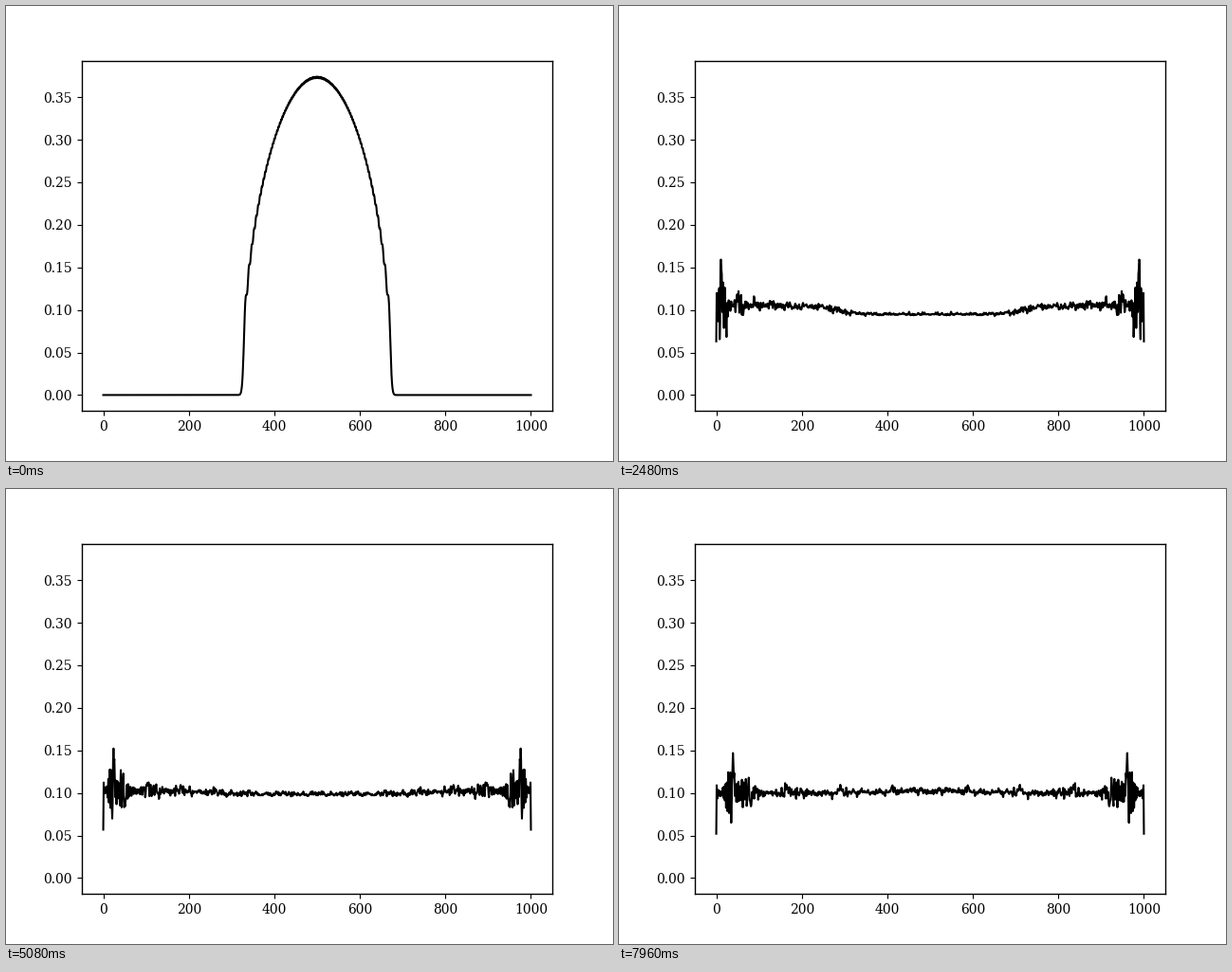
These frames come from a looping animation (640 by 480 pixels, 8 s). A matplotlib script:

```python
import numpy as np
import matplotlib.pyplot as plt
from matplotlib.animation import FuncAnimation

# Free lattice fermions released from a harmonic trap into a hard-walled box.
SITES = 1001
FERMIONS = 101
TRAP = 10
FRAMES = 200
INTERVAL = 40
TIMES = np.linspace(0, 10000, 300)[:FRAMES]
MODES = 600

plt.rcParams["font.family"] = "DejaVu Serif"
plt.rcParams["axes.linewidth"] = 1.0
plt.rcParams["ytick.major.pad"] = 4.2


def trapped_orbitals():
    x = np.linspace(-1, 1, SITES)
    hop = np.ones(SITES - 1)
    h = np.diag(TRAP * x**2) - np.diag(hop, 1) - np.diag(hop, -1)
    return np.linalg.eigh(h)[1][:, :FERMIONS]


k = np.pi * np.arange(1, MODES + 1) / (SITES + 1)
energy = -2 * np.cos(k)
waves = np.sqrt(2 / (SITES + 1)) * np.sin(np.outer(np.arange(1, SITES + 1), k))
coeffs = waves.T @ trapped_orbitals()
half = waves[:SITES // 2 + 1]


def density(t):
    # The cloud is symmetric, so only the left half and the centre are evolved.
    re = half @ (np.cos(energy * t)[:, None] * coeffs)
    im = half @ (np.sin(energy * t)[:, None] * coeffs)
    left = (re**2 + im**2).sum(axis=1)
    return np.concatenate([left, left[-2::-1]])


fig, ax = plt.subplots(figsize=(6.4, 4.8), dpi=100)
line, = ax.plot(np.arange(SITES), density(0), color="black", lw=1.5)
ax.set_xlim(ax.get_xlim())
ax.set_ylim(ax.get_ylim())


def update(i):
    line.set_ydata(density(TIMES[i]))
    return line,


anim = FuncAnimation(fig, update, frames=FRAMES, interval=INTERVAL,
                     repeat=True, repeat_delay=0)
plt.show()
```
